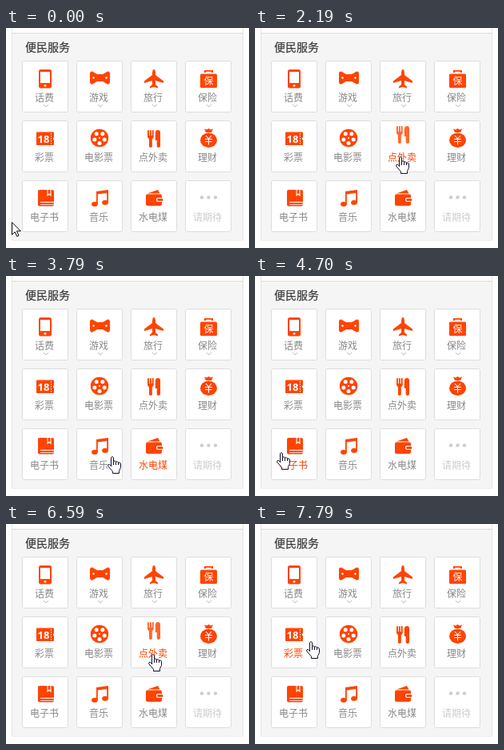
An HTML page for the animation above (8000 ms loop, 304 by 276 pixels).

```html
<!DOCTYPE html>
<html lang="zh-CN">
<head>
<meta charset="utf-8">
<style>
  html, body { margin: 0; width: 100%; height: 100%; overflow: hidden; background: #fff; }
  #stage { display: block; width: 304px; height: 276px; }
  text { font-family: "Noto Sans CJK SC", "Noto Sans CJK", sans-serif; }
  .title { font-size: 14px; font-weight: 500; fill: #3c3c3c; stroke: #3c3c3c; stroke-width: .25; }
  .label { font-size: 12px; fill: #888; text-anchor: middle; }
  .off { fill: #ccc; }
  .hot .label { fill: #f40; }
  .icon { fill: #f40; }
  .icon text { text-anchor: middle; fill: #fff; }
  .number { font: 700 13px "Open Sans", sans-serif; }
  .w { fill: #fff; }
  .line { fill: none; stroke: #fff; }
</style>
</head>
<body>
<svg id="stage" viewBox="0 0 304 276">
  <path fill="#f5f5f5" d="M8 7H296V267H8Z"/>
  <path fill="none" stroke="#e4e4e4" d="M7.5 0V267M296.5 0V267"/>
  <path stroke="#ddd" d="M7 6.5H297"/>
  <path stroke="#eee" d="M7 266.5H297"/>
  <text class="title" x="24" y="29">便民服务</text>
  <g id="cells"></g>
  <g id="arrow" fill="#fff" stroke="#000">
    <path d="M.5 .8V16.3L4.2 12.8L6.8 18.5L9 17.5L6.5 11.8H11.4Z"/>
  </g>
  <g id="hand" fill="#fff" stroke="#101028">
    <path transform="translate(-6)" d="M4.5 13V1.7Q6 -.6 7.5 1.7V6.5Q9.2 5 10.5 7Q12.3 5.8 13.5 8Q16.5 7.5 16.5 10V14.5L14.5 18.5V21.5H6.5V19.2L.7 12.5Q.3 10 2.5 10.3L4.5 12.3M7.5 6.5V11M10.5 7V11M13.5 8V11"/>
  </g>
</svg>
<script>
const LOOP = 8000;
const CELL_W = 58, CELL_H = 65, GAP = 10;
const SLIDE = 25, HALF = 150;   // icon travel in px, time for each half in ms
const LAG = 40;                 // highlight trails the pointer

const circle = (x, y, r, cls = '') => `<circle class="${cls}" cx="${x}" cy="${y}" r="${r}"/>`;
const ellipse = (x, y, rx, ry) => `<ellipse cx="${x}" cy="${y}" rx="${rx}" ry="${ry}"/>`;
const box = (x, y, w, h, r = 0, cls = '') =>
  `<rect class="${cls}" x="${x}" y="${y}" width="${w}" height="${h}" rx="${r}"/>`;
const path = (d, cls = '', width = 1) => `<path class="${cls}" stroke-width="${width}" d="${d}"/>`;
const range = n => [...Array(n).keys()];

const reelHoles = range(5).map(i => {
  const a = Math.PI * (.5 + i * .4);
  return circle(29 + 6.5 * Math.cos(a), 22 + 6.5 * Math.sin(a), 2.5, 'w');
}).join('');
const tines = range(3).map(i => box(21 + 2.9 * i, 12, 1.9, 9, .9)).join('');
const dots = range(3).map(i => box(19 + 8.5 * i, 19.5, 4, 4, 1.2, 'off')).join('');

const services = [
  ['话费', box(21, 11, 16, 23.5, 2.5) + box(23, 14, 12, 14, 0, 'w') + circle(29, 31.3, 1.4, 'w')],
  ['游戏', path('M17 16.5Q17 13 20 13.5L26 17H33L39 13.5Q42 13 42 16.5V26.5Q42 30 39 29.5L33 26H26L20 29.5Q17 30 17 26.5Z')
    + circle(21.5, 21.5, 1.2, 'w') + circle(37.5, 21.5, 1.2, 'w')],
  ['旅行', path('M29 10.5Q31 11.5 31 15V18L41 25.5V28L31 25V30L34 32.5V34.3L29 33L24 34.3V32.5L27 30V25L17 28V25.5L27 18V15Q27 11.5 29 10.5Z')],
  ['保险', path('M24 15V12H35V15H33V13.7H26V15Z') + box(19, 16.5, 21, 17.5, 1.5)
    + '<text x="29.5" y="29.8" font-size="12">保</text>'],
  ['彩票', box(18, 14.5, 22, 16.5, 1) + '<text class="number" x="27" y="27.5">18</text>'
    + '<path class="line" stroke-dasharray="1.5 1.5" d="M36.5 16V31"/>' + circle(40.3, 22.7, 1.5, 'w')],
  ['电影票', circle(29, 22, 11.2) + reelHoles + circle(29, 22, 1, 'w')],
  ['点外卖', tines + path('M21 19H28.7Q28.7 22.5 26.8 23.5V33Q24.9 35 23 33V23.5Q21 22.5 21 19Z')
    + path('M30.8 16Q31 12 34 12Q37 12 37 15V32.5Q34.8 35.5 32.7 32.5V25H30.8Z')],
  ['理财', path('M24 10.5L27 11.5L29.5 10L32 11.5L35 10.5L33 15H26Z') + ellipse(29.5, 24.8, 10.5, 9.2)
    + path('M26 19L29.5 23L33 19M29.5 23V30.5M25 23.5H34M25 26.5H34', 'line', 1.1)],
  ['电子书', box(20, 12, 20, 20.5, 2) + path('M23 27.5H40M23 30.2H40', 'line') + box(23, 28, 16, 1.7)
    + path('M32 12V19L34 17.3L36 19V12', 'line', 1.1)],
  ['音乐', path('M25 14L40 12V28H38.2V16L26.8 17.6V30H25Z') + ellipse(22.9, 30, 3.9, 3) + ellipse(36, 28, 3.9, 3)],
  ['水电煤', path('M21 16.5L34 12L36.5 16.5Z') + box(19, 17.5, 20, 14.5, 2)
    + box(32, 22, 8, 5, 2, 'w') + box(33, 23, 7.5, 3, 1.5)],
  ['请期待', dots],
];
const LAST = services.length - 1;

const cellX = i => 20 + (CELL_W + GAP) * (i % 4);
const cellY = i => 41 + (CELL_H + GAP) * Math.floor(i / 4);

document.getElementById('cells').innerHTML = services.map(([name, art], i) => `
  <svg class="cell" x="${cellX(i)}" y="${cellY(i)}" width="${CELL_W}" height="${CELL_H}">
    <rect x=".5" y=".5" width="57" height="64" rx="2" fill="#fff" stroke="#ddd"/>
    <svg x="1" y="1" width="56" height="63" viewBox="1 1 56 63"><g class="icon">${art}</g></svg>
    <text class="label ${i === LAST ? 'off' : ''}" x="28" y="51">${name}</text>
    ${i < 4 ? '<path fill="none" stroke="#bbb" d="M27 55L30 58L33 55"/>' : ''}
  </svg>`).join('');

const cells = [...document.querySelectorAll('.cell')];
const icons = [...document.querySelectorAll('.icon')];
const arrow = document.getElementById('arrow');
const hand = document.getElementById('hand');

// Pointer glides: when each begins and ends, and where the tip comes to rest
const home = { x: 7, y: 243 };
const glides = [
  { from: 330, to: 690, x: 14, y: 167 },
  { from: 890, to: 1190, x: 40, y: 166 },
  { from: 1450, to: 1810, x: 112, y: 161 },
  { from: 2070, to: 2300, x: 190, y: 161 },
  { from: 2580, to: 2860, x: 280, y: 156 },
  { from: 3170, to: 3590, x: 184, y: 227 },
  { from: 3730, to: 3970, x: 96, y: 226 },
  { from: 4120, to: 4580, x: 62, y: 223 },
  { from: 4620, to: 4920, x: 14, y: 220 },
  { from: 5140, to: 5440, x: 60, y: 222 },
  { from: 5470, to: 5930, x: 107, y: 228 },
  { from: 5990, to: 6450, x: 182, y: 222 },
  { from: 6490, to: 6590, x: 184, y: 163 },
  { from: 6830, to: 7200, x: 116, y: 160 },
  { from: 7240, to: 7700, x: 70, y: 147 },
];

const easeOut = u => 1 - (1 - u) ** 3;

function pointerAt(t) {
  let { x, y } = home;
  for (const g of glides) {
    if (t < g.from) break;
    const k = easeOut(Math.min(1, (t - g.from) / (g.to - g.from)));
    x += (g.x - x) * k;
    y += (g.y - y) * k;
  }
  return [Math.round(x), Math.round(y)];
}

const cellUnder = ([x, y]) => services.findIndex((_, i) =>
  x >= cellX(i) && x < cellX(i) + CELL_W && y >= cellY(i) && y < cellY(i) + CELL_H);
const hoveredAt = t => cellUnder(pointerAt(t - LAG));

// Time since the pointer entered the cell, up to the length of the slide
function hoverAge(t, cell) {
  let age = 0;
  while (age < 2 * HALF && hoveredAt(t - age) === cell) age += 2;
  return age;
}

// Out through the top while fading, then back in from below
function slide(age) {
  const k = age / HALF;
  return k < 1 ? [-SLIDE * k, 1 - k] : [SLIDE * (2 - k), k - 1];
}

function draw(t) {
  const hovered = hoveredAt(t);
  cells.forEach((cell, i) => {
    const hot = i === hovered && i !== LAST;
    const [dy, alpha] = slide(hot ? hoverAge(t, i) : 0);
    cell.classList.toggle('hot', hot);
    icons[i].setAttribute('transform', `translate(0 ${Math.round(dy)})`);
    icons[i].setAttribute('opacity', alpha);
  });
  const tip = pointerAt(t), isHand = cellUnder(tip) >= 0;
  for (const [node, shown] of [[hand, isHand], [arrow, !isHand]]) {
    node.setAttribute('transform', `translate(${tip})`);
    node.style.display = shown ? '' : 'none';
  }
}

const begin = performance.now();
function tick() {
  draw((performance.now() - begin) % LOOP);
  requestAnimationFrame(tick);
}
tick();
</script>
</body>
</html>
```
